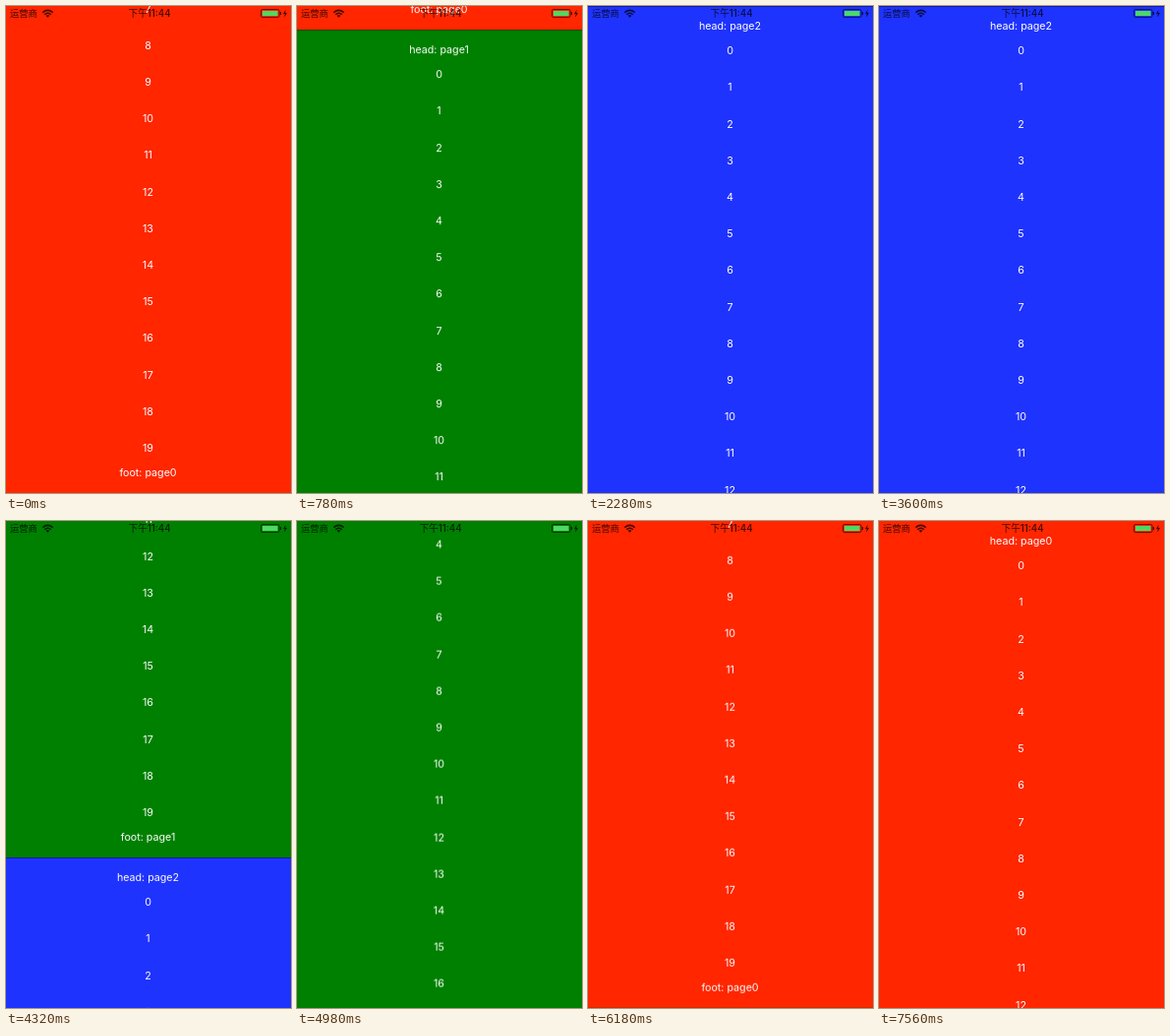
These frames come from a looping animation (290x495 px, 7920 ms). An HTML page:

```html
<!DOCTYPE html>
<html lang="zh">
<head>
<meta charset="utf-8">
<title>Paged lists</title>
<style>
  html, body { margin: 0; width: 100%; height: 100%; overflow: hidden; background: #ff2600; }
  #stage { position: relative; width: 290px; height: 495px; overflow: hidden; background: #ff2600; }
  #track { position: absolute; top: 0; left: 0; width: 290px; will-change: transform; }
  .page { position: relative; height: 798px; }
  .page + .page { box-shadow: inset 0 1px rgba(0, 0, 0, .4); }
  .page div {
    position: absolute; left: 0; width: 289px; height: 20px; margin-top: -10px;
    font: 10.7px/20px Inter, "Open Sans", sans-serif; color: #fff; text-align: center;
  }
  #status { position: absolute; top: 0; left: 0; }
  #status text { font: 9.3px "Noto Sans CJK SC", "Noto Sans CJK", Inter, sans-serif; }
  #status .clock { font: 500 9.7px Inter, "Noto Sans CJK SC", "Noto Sans CJK", sans-serif; }
</style>
</head>
<body>
<div id="stage">
  <div id="track"></div>
  <svg id="status" width="290" height="16" fill="#000" fill-opacity=".75">
    <text x="4" y="11">运营商</text>
    <path fill="none" stroke="#000" stroke-opacity=".75" stroke-width="1.5"
      d="M37.3 6.6Q42.5 2.2 47.7 6.6M39.2 8.7Q42.5 5.9 45.8 8.7"/>
    <path d="M40.6 9.7Q42.5 8.3 44.4 9.7L42.5 11.8Z"/>
    <text class="clock" x="146" y="11" text-anchor="middle">下午11:44</text>
    <rect x="259.5" y="3.5" width="18.5" height="8" rx="1.5" fill="none" stroke="#000" stroke-opacity=".65" stroke-width=".9"/>
    <rect x="261" y="5" width="15.5" height="5" fill="#4cd964" fill-opacity="1"/>
    <rect x="278.7" y="6" width="1.3" height="3"/>
    <path d="M284.6 3.8L282 8H283.7L283.2 11.4L286 7H284.2Z"/>
  </svg>
</div>
<script>
  const LOOP = 7920, TICK = 60, PAGE = 798, VIEW = 495;
  const track = document.getElementById('track');

  function addLabel(page, y, text) {
    const label = document.createElement('div');
    label.style.top = y + 'px';
    label.textContent = text;
    page.append(label);
  }

  ['#ff2600', '#008000', '#1f33ff'].forEach((color, n) => {
    const page = document.createElement('div');
    page.className = 'page';
    page.style.background = color;
    addLabel(page, 21.3, 'head: page' + n);
    for (let i = 0; i < 20; i++) addLabel(page, 46.2 + i * 37.2, i);
    addLabel(page, 777.8, 'foot: page' + n);
    track.append(page);
  });

  const pageTop = n => n * PAGE;
  const pageEnd = n => (n + 1) * PAGE - VIEW;

  // start ms, ticks, destination, ease-in power, ease-out power
  const scrolls = [
    [420, 10, pageTop(1), 1.5, 3.43],
    [1140, 4, pageEnd(1), 1, 2],
    [1740, 10, pageTop(2), 1.5, 2.2],
    [2520, 5, pageEnd(2), 1, 2],
    [3300, 6, pageTop(2), 1, 2],
    [4140, 9, pageEnd(1), 1.5, 3.34],
    [4980, 4, pageTop(1), 1, 2],
    [5700, 10, pageEnd(0), 1, 3.35],
    [6480, 4, pageTop(0), 1, 2]
  ];
  const pull = { start: 7080, ticks: 9, depth: 70 };

  function progress(t, start, ticks) {
    if (t < start) return 0;
    return Math.min((Math.floor((t - start) / TICK) + 1) / ticks, 1);
  }

  function offset(t) {
    let y = pageEnd(0);
    for (const [start, ticks, to, a, b] of scrolls) {
      const u = progress(t, start, ticks);
      y += (to - y) * (1 - (1 - u ** a) ** b);
    }
    const u = progress(t, pull.start, pull.ticks);
    return y - pull.depth * Math.sin(Math.PI * u ** 0.7);
  }

  const begin = performance.now();
  function draw() {
    const t = (performance.now() - begin) % LOOP;
    track.style.transform = `translateY(${-offset(t).toFixed(1)}px)`;
    requestAnimationFrame(draw);
  }
  draw();
</script>
</body>
</html>
```
